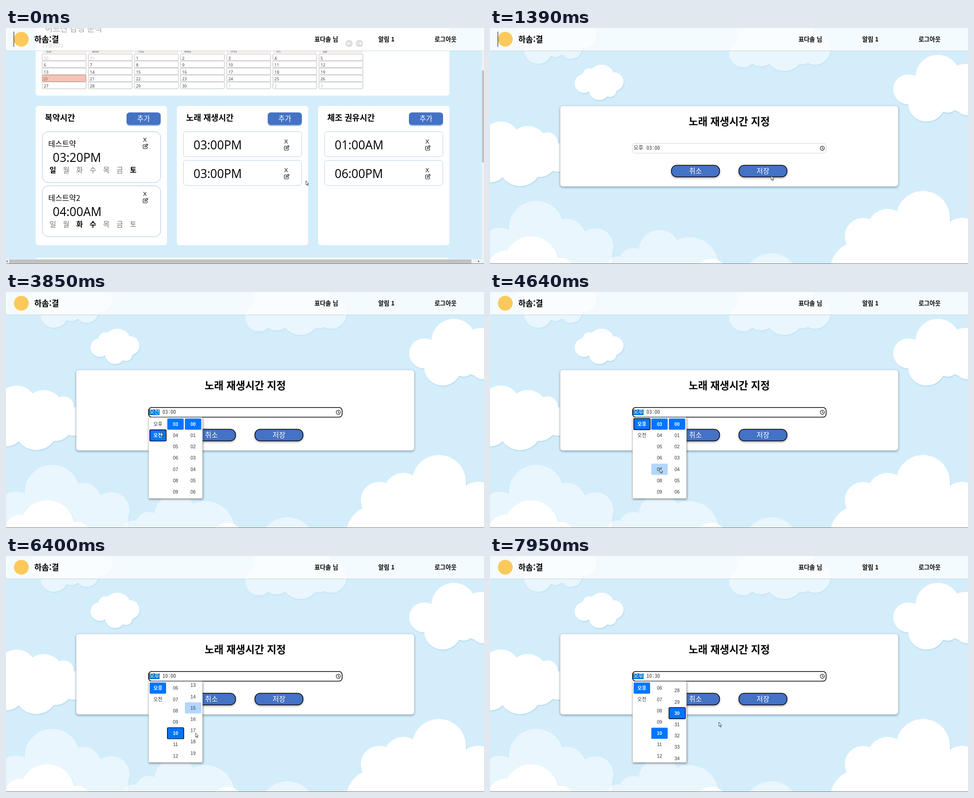
Recreate the animation shown at these times as an HTML page. Size 1063 by 527 pixels, loop 8000 ms.

```html
<!DOCTYPE html>
<html lang="ko">
<head>
<meta charset="utf-8">
<title>시간 지정</title>
<style>
html, body { margin: 0; width: 100%; height: 100%; overflow: hidden; background: #d4edfb; }
svg { display: block; width: 100%; height: 100%; }
text { font-family: "Noto Sans CJK KR", "Noto Sans CJK", sans-serif; white-space: pre; }
.num { font-family: "Open Sans", "Noto Sans", sans-serif; }
.mono { font-family: "Noto Sans Mono CJK KR", "Noto Sans Mono", monospace; font-weight: 300; }
.list text { font-family: "Liberation Sans", "Noto Sans CJK KR", sans-serif; }
.b { font-weight: 700; }
.mid { text-anchor: middle; }
.line { fill: none; stroke: #111; stroke-width: 1.2; stroke-linejoin: round; }
.cloud { filter: drop-shadow(1px 2px 1px rgba(110, 175, 210, .3)); }
.card { filter: drop-shadow(0 2px 2px rgba(60, 90, 110, .5)); }
.pop { filter: drop-shadow(1px 2px 2px rgba(0, 0, 0, .4)); }
.btn { filter: drop-shadow(0 2px 2px rgba(0, 0, 0, .35)); }

.step { animation: 8s step-end infinite; }
.move { animation: 8s linear infinite; }

@keyframes page { 0% { opacity: 0 } 17.3% { opacity: 1 } }
@keyframes focus { 0% { opacity: 0 } 29.4% { opacity: 1 } }
@keyframes open { 0% { opacity: 0 } 31.4% { opacity: 1 } }
@keyframes caret {
  0% { opacity: 1 } 8.1% { opacity: 0 } 14.7% { opacity: 1 }
  21.4% { opacity: 0 } 28.1% { opacity: 1 } 29.4% { opacity: 0 }
}
@keyframes pm { 0% { opacity: 1 } 46.9% { opacity: 0 } 53.8% { opacity: 1 } }
@keyframes am { 0% { opacity: 0 } 46.9% { opacity: 1 } 53.8% { opacity: 0 } }
@keyframes hour-off { 0% { opacity: 1 } 63.7% { opacity: 0 } }
@keyframes hour-on { 0% { opacity: 0 } 63.7% { opacity: 1 } }
@keyframes min-off { 0% { opacity: 1 } 95.6% { opacity: 0 } }
@keyframes min-on { 0% { opacity: 0 } 95.6% { opacity: 1 } }
@keyframes text-off { 0% { opacity: 1 } 96.7% { opacity: 0 } }
@keyframes text-on { 0% { opacity: 0 } 96.7% { opacity: 1 } }

@keyframes hour-scroll {
  0%, 58.1% { transform: translateY(0); animation-timing-function: ease-in-out }
  61.4%, 100% { transform: translateY(-75.6px) }
}
@keyframes min-scroll {
  0%, 76.9% { transform: translateY(0) }
  80% { transform: translateY(-333px); animation-timing-function: ease-out }
  81.7%, 86% { transform: translateY(-400px); animation-timing-function: ease-in-out }
  91.2%, 100% { transform: translateY(-700px) }
}
@keyframes half-hover {
  0% { opacity: 0; transform: translateY(25.2px) }
  39.5% { opacity: 1; transform: translateY(25.2px) }
  47% { opacity: 0; transform: translateY(25.2px) }
}
@keyframes hour-hover {
  0% { opacity: 0; transform: none }
  56% { opacity: 1; transform: translateY(100.8px) }
  59.8% { opacity: 1; transform: translateY(151.2px) }
  61.2% { opacity: 1; transform: translateY(176.4px) }
  63.7% { opacity: 0; transform: none }
}
@keyframes min-hover {
  0% { opacity: 0; transform: none }
  74.8% { opacity: 1; transform: translateY(100.8px) }
  77.9% { opacity: 1; transform: translateY(226.8px) }
  79.3% { opacity: 1; transform: translateY(378px) }
  81.6% { opacity: 1; transform: translateY(504px) }
  87.8% { opacity: 1; transform: translateY(655.2px) }
  91% { opacity: 1; transform: translateY(806.4px) }
  93.4% { opacity: 1; transform: translateY(756px) }
  95.6% { opacity: 0; transform: none }
}
@keyframes cursor {
  0%, 3.2% { transform: translate(667px, 341px) }
  13% { transform: translate(627px, 330px) }
  15.6%, 23% { transform: translate(625px, 330px) }
  27.4% { transform: translate(688px, 313px) }
  29.3%, 32% { transform: translate(738px, 273px) }
  40% { transform: translate(346px, 316px) }
  45.5%, 49.5% { transform: translate(344px, 313px) }
  52% { transform: translate(342px, 314px) }
  53.6% { transform: translate(341px, 297px) }
  57%, 64.5% { transform: translate(378px, 394px) }
  68.5%, 70.2% { transform: translate(481.5px, 384px) }
  73% { transform: translate(446px, 391px) }
  75%, 92% { transform: translate(421.5px, 395px) }
  94%, 96.5% { transform: translate(420px, 350px) }
  99.2%, 100% { transform: translate(509px, 371px) }
}
</style>
</head>
<body>
<svg id="stage" viewBox="0 0 1063 527" preserveAspectRatio="none"></svg>
<script>
const SKY = '#d4edfb', BLUE = '#4472c4', PICK = '#0075ff', ROW = 25.2;

const rect = (x, y, w, h, fill, r = 0, more = '') =>
  `<rect x="${x}" y="${y}" width="${w}" height="${h}" rx="${r}" fill="${fill}" ${more}/>`;
const text = (s, x, y, size, cls = '', fill = '#000') =>
  `<text x="${x}" y="${y}" font-size="${size}" class="${cls}" fill="${fill}">${s}</text>`;
const step = (name, body) => `<g class="step" style="animation-name:${name}">${body}</g>`;
const move = (name, body) => `<g class="move" style="animation-name:${name}">${body}</g>`;
const range = (n, fn) => Array.from({ length: n }, (_, i) => fn(i)).join('');
const pad = n => String(n).padStart(2, '0');
const stroke = (color, w = 1) => `stroke="${color}" stroke-width="${w}"`;

// Dashboard page
const tools = (x, y) => text('X', x, y + 4.6, 13.5, 'num mid') +
  `<g transform="translate(${x + 1} ${y + 15})" class="line">
    <path d="M-.5-4H-3.5Q-5-4-5-2.5V3.5Q-5 5-3.5 5H2.5Q4 5 4 3.5V.5"/>
    <path d="M-1.5 1.5L-1-1L3.5-5.5L5.5-3.5L1 1Z"/></g>`;

const panel = (x, title) => rect(x, 174, 292, 311, '#fff', 6) +
  text(title, x + 20.5, 207, 18.2, 'b') +
  rect(x + 202, 191, 76, 28, '#a9c4ec', 7) + rect(x + 202, 188.5, 76, 28, BLUE, 7) +
  text('추가', x + 240, 208, 15.5, 'mid', '#fff');

const medicine = (y, name, time, days) =>
  rect(81, y + .5, 263, 113.5, '#fff', 13, stroke('#a9bfe4')) +
  text(name, 94, y + 33.5, 16.8) + text(time, 104, y + 68, 26.5, 'num') +
  [...'일월화수목금토'].map((d, i) => {
    const on = days.includes(d);
    return text(d, 104 + i * 29.8, y + 92, 16, on ? 'mid b' : 'mid', on ? '#000' : '#777');
  }).join('') + tools(309, y + 18.5);

const alarm = (x, y, time) =>
  rect(x + .5, y + .5, 263, 56, '#fff', 6, stroke('#bccde8')) +
  text(time, x + 23, y + 39.5, 26.5, 'num') + tools(x + 229, y + 22);

const calendar = () =>
  ['Sun', 'Mon', 'Tue', 'Wed', 'Thrs', 'Fri', 'Sat'].map((d, i) => {
    const x = 81 + i * 102.5, name = i === 2 ? 'Thu' : d;
    return rect(x, 50, 98, 6, '#fbeeea', 2) + text(name, x + 8, 54.7, 7.2, 'num', '#444');
  }).join('') +
  range(35, i => {
    const x = 80.5 + i % 7 * 102.6, y = 58 + Math.floor(i / 7) * 15.65;
    const n = i - 1, other = n < 1 || n > 30, today = n === 20;
    const day = n < 1 ? n + 31 : n > 30 ? n - 30 : n;
    return rect(x, y, 97.5, 15, today ? '#f4c5b5' : '#fff', 2, stroke(today ? '#b9877a' : '#b5b5b5')) +
      text(day, x + (today ? 2 : 3.5), y + 12.5, 9, 'num', other ? '#bbb' : today ? '#8a5a4c' : '#333');
  });

const arrow = (x, d) => `<circle cx="${x}" cy="34.5" r="8" fill="#777"/>
  <path d="M${x - 4 * d} 34.5H${x + 4 * d}M${x + d} 31.5L${x + 4 * d} 34.5L${x + d} 37.5" fill="none" stroke="#fff" stroke-width="1.4"/>`;

const dashboard = rect(0, 0, 1063, 527, SKY) +
  rect(66, -20, 920, 171, '#fff', 6) +
  text('어르신 감정 분석', 87, 7.5, 18.1, 'b') + text('11월2022', 81, 42.5, 11, '', '#444') +
  arrow(763, -1) + arrow(786, 1) + calendar() +
  panel(66, '복약시간') + panel(380, '노래 재생시간') + panel(694, '체조 권유시간') +
  medicine(231, '테스트약', '03:20PM', '일토') + medicine(352, '테스트약2', '04:00AM', '화수') +
  alarm(394, 231, '03:00PM') + alarm(394, 295, '03:00PM') +
  alarm(708, 231, '01:00AM') + alarm(708, 295, '06:00PM') +
  rect(66, 513, 920, 20, '#fff', 6) +
  rect(1058, 0, 5, 527, '#f1f1f1') + rect(1058.5, 95, 4.5, 205, '#c1c1c1') +
  rect(0, 516, 1063, 11, '#f1f1f1') + rect(7, 517, 1028, 8.5, '#c1c1c1') +
  '<path d="M3.5 518.5V523.5L.5 521ZM1050 518.5V523.5L1053 521Z" fill="#666"/>';

// Form page
const cloud = (opacity, circles, base = '') =>
  `<g class="cloud" opacity="${opacity}" fill="#fff">` +
  circles.split(' ').map(c => {
    const [x, y, r] = c.split(',');
    return `<circle cx="${x}" cy="${y}" r="${r}"/>`;
  }).join('') + base + '</g>';

const clouds =
  cloud(.5, '107,49,31 145,42,23 180,44,25 78,20,26 210,18,27', rect(70, -20, 145, 64, '#fff')) +
  cloud(.5, '563,57,31 590,8,40 602,54,32 655,52,44 695,50,31 723,48,34 655,5,67') +
  cloud(1, '209,124,21 221,105,15 248,112,30 276,120,21 243,138,23 267,140,14') +
  cloud(1, '996,110,50 930,137,33.5 971,168,41 1018,165,24 1060,135,55 1062,165,30') +
  cloud(1, '24,253,44 84,264,45 128,256,23 0,305,40 67,305,48 110,295,38 150,289,32') +
  cloud(.5, '103,447,61 170,470,44 234,488,41 22,490,44', rect(0, 488, 272, 50, '#fff')) +
  cloud(1, '92,525,60 34,535,38 157,545,32') +
  cloud(.5, '377,497,46 318,521,30 443,533,66 285,540,30', rect(318, 510, 110, 30, '#fff')) +
  cloud(.5, '626,565,62') + cloud(1, '492,551,36') +
  cloud(1, '963,424,60 830,465,41 884,449,45 820,540,63 1050,475,51', rect(825, 464, 250, 80, '#fff'));

const button = (x, label) =>
  `<g class="btn">${rect(x, 306.5, 107, 26, BLUE, 12, stroke('#000', 1.5))}</g>` +
  text(label, x + 53.5, 325, 15.5, 'mid', '#fff');

const field = rect(316.5, 257.5, 431, 22, '#fff', 6, stroke('#c9d2dc')) +
  text('오후', 319, 272.3, 12, '', '#333') +
  step('focus',
    rect(317, 258, 430.5, 21.5, 'none', 7, stroke('#000', 1.6)) +
    rect(318, 262, 23.5, 13, '#0078d7') +
    step('pm', text('오후', 319, 272.3, 12, '', '#fff')) +
    step('am', text('오전', 319, 272.3, 12, '', '#fff'))) +
  step('hour-off', text('03', 348, 272.2, 12, 'mono', '#333')) +
  step('hour-on', text('10', 348, 272.2, 12, 'mono', '#333')) +
  text(':', 360, 272.2, 12, 'mono', '#333') +
  step('text-off', text('00', 366, 272.2, 12, 'mono', '#333')) +
  step('text-on', text('30', 366, 272.2, 12, 'mono', '#333')) +
  '<circle cx="739" cy="268.5" r="4.6" class="line"/><path d="M739 265.5V268.7L741.3 270" class="line"/>';

// Time picker
const cell = (x, row, fill, more) => rect(x, 282.5 + row * ROW, 36.5, 25, fill, 2, more);
const label = (s, x, row, cls, fill) =>
  text(s, x + 18.2, 298.8 + row * ROW, /\d/.test(s) ? 10.3 : 10.9, 'mid ' + cls, fill);
const picked = (s, x, row) => cell(x, row, PICK) + label(s, x, row, 'b', '#fff');
const ring = (x, row) => cell(x + .2, row, 'none', stroke('#000', 1.4));
const column = (x, items, hover) => step(hover, cell(x, 0, '#b2d6ff')) +
  items.map((s, i) => label(s, x, i, '', '#333')).join('');

const X1 = 319.5, X2 = 358.7, X3 = 397.8;
const hours = Array.from({ length: 12 }, (_, i) => pad((i + 2) % 12 + 1));
const minutes = Array.from({ length: 45 }, (_, i) => pad(i));

const picker = `<g class="pop">${rect(317, 280, 120, 181, '#fff', 1, stroke('#b8b8b8', .8))}</g>
  <g class="list" clip-path="url(#window)">` +
  column(X1, ['오후', '오전'], 'half-hover') +
  step('pm', picked('오후', X1, 0) + step('hour-off', ring(X1, 0))) +
  step('am', picked('오전', X1, 1) + ring(X1, 1)) +
  move('hour-scroll', column(X2, hours, 'hour-hover') +
    step('hour-off', picked('03', X2, 0)) +
    step('hour-on', picked('10', X2, 7) + step('min-off', ring(X2, 7)))) +
  move('min-scroll', column(X3, minutes, 'min-hover') +
    step('min-off', picked('00', X3, 0)) +
    step('min-on', picked('30', X3, 30) + ring(X3, 30))) +
  '</g>';

const form = rect(0, 0, 1063, 527, SKY) + clouds +
  `<g class="card">${rect(156, 174, 752, 180, '#fff', 6, stroke('#b9c9d6', .8))}</g>` +
  text('노래 재생시간 지정', 532, 217.3, 22.8, 'b mid') +
  field + button(403.5, '취소') + button(553.5, '저장') + step('open', picker);

const nav = rect(0, 0, 1063, 51, '#fff', 0, 'fill-opacity=".75"') +
  rect(0, 50.5, 1063, 1, '#b9cdd8', 0, 'fill-opacity=".8"') +
  '<circle cx="34" cy="25" r="16.5" fill="#fdc95b"/>' +
  text('하솜:결', 63, 32, 17.8, 'b') + text('표다솔 님', 686, 30, 13.3, 'b') +
  text('알림 1', 828, 30, 13.3, 'b') + text('로그아웃', 953, 30, 13.3, 'b') +
  step('caret', rect(17, 8, 1, 34, '#000'));

const pointer = move('cursor',
  '<path d="M0 0V9.4L2.1 7.5L3.7 11L5 10.4L3.5 7H6.4Z" fill="#fff" stroke="#111" stroke-width=".8"/>');

document.getElementById('stage').innerHTML =
  '<clipPath id="window"><rect x="317" y="280.5" width="120" height="180"/></clipPath>' +
  dashboard + step('page', form) + nav + rect(0, 526, 1063, 1, '#6b6b6b') + pointer;
</script>
</body>
</html>
```
